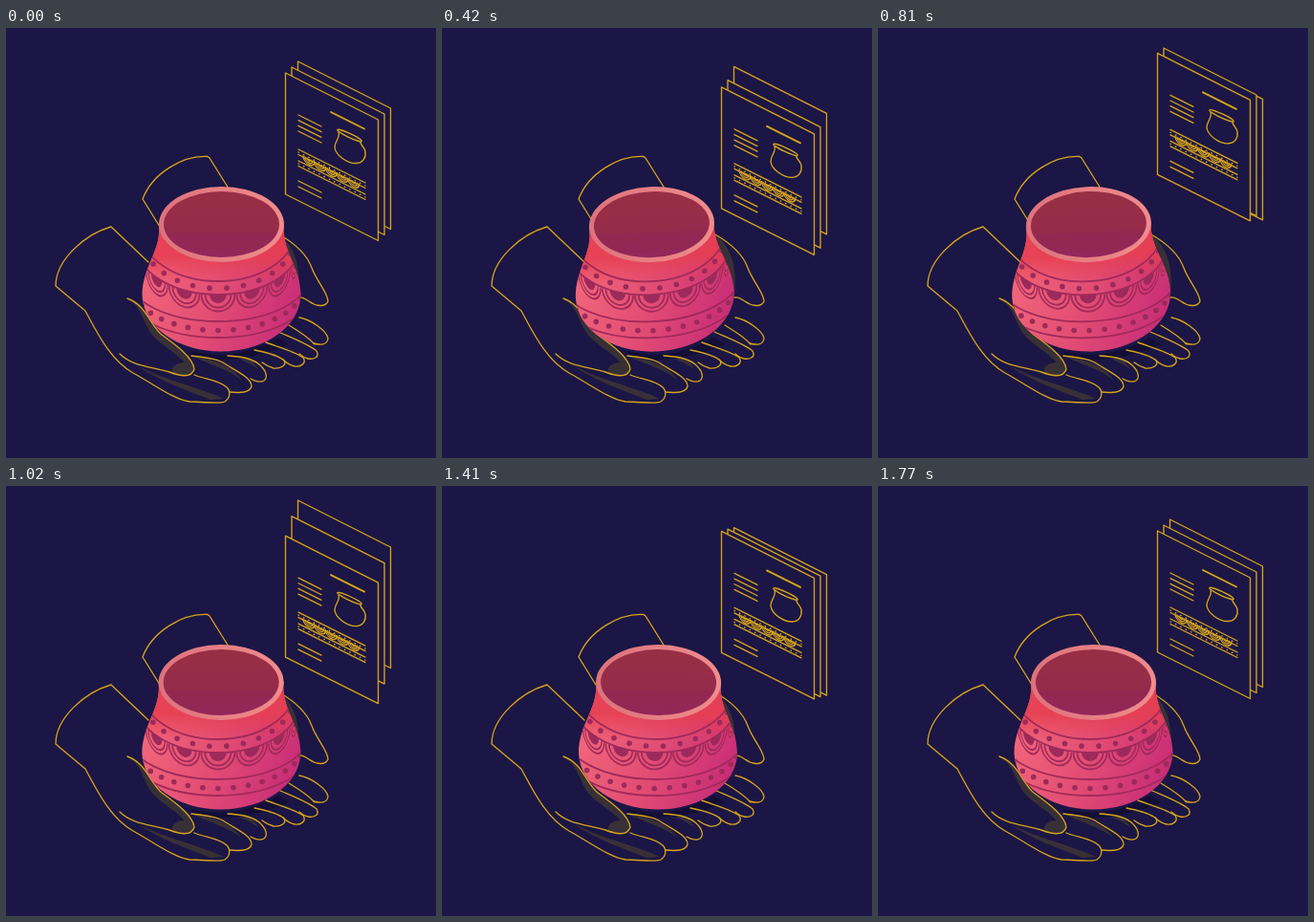
An HTML page that plays this animation: 450x450 px, repeating every 1800 ms.

```html
<!DOCTYPE html>
<html>
<head>
<meta charset="utf-8">
<style>
html, body { margin: 0; width: 100%; height: 100%; overflow: hidden; background: #1b1645 }
svg { display: block; width: 100vw; height: 100vh }
.line { fill: none; stroke: #d6a31a; stroke-width: 1.35; stroke-linejoin: round; stroke-linecap: round }
.shade { fill: #383037 }
.sheet { fill: #1b1645; stroke: #d6a31a; stroke-width: 1.35; stroke-linejoin: round }
.deco { fill: none; stroke: #a12a5a; stroke-width: 1.8 }
.dot { fill: #9c2a5a }
</style>
</head>
<body>
<svg viewBox="0 0 450 450">
  <defs>
    <linearGradient id="clay" gradientUnits="userSpaceOnUse" x1="150" y1="250" x2="298" y2="312">
      <stop offset="0" stop-color="#f1667a"/><stop offset=".5" stop-color="#e24c74"/><stop offset="1" stop-color="#c82d77"/>
    </linearGradient>
    <linearGradient id="neck" gradientUnits="userSpaceOnUse" x1="0" y1="238" x2="0" y2="266">
      <stop offset="0" stop-color="#e63e51" stop-opacity=".9"/><stop offset="1" stop-color="#e63e51" stop-opacity="0"/>
    </linearGradient>
    <linearGradient id="rim">
      <stop offset="0" stop-color="#dd727c"/><stop offset="1" stop-color="#f08c8c"/>
    </linearGradient>
    <linearGradient id="hole" x2="0" y2="1">
      <stop offset="0" stop-color="#992f43"/><stop offset=".62" stop-color="#952b4b"/>
      <stop offset=".62" stop-color="#922950"/><stop offset="1" stop-color="#93275a"/>
    </linearGradient>
    <path id="body" d="M160 205C163 233 143 249 142.500 279C143 313 180 338.500 225 338.500S308 313 308.500 279C308 249 288 233 291 205Z"/>
    <clipPath id="inside"><use href="#body"/></clipPath>
    <path id="page" d="M0 0L97 49V175.500L0 127Z"/>
  </defs>

  <g class="shade">
    <path d="M127 283C147 290 150 310 163 321C178 332 196 345 197 357C194 366 183 365 174 360C172 354 180 350 187 350C176 338 157 329 150 317C142 302 140 291 127 283Z"/>
    <path d="M136 352C160 367 200 375 228 388L214 389C192 380 160 370 136 352Z"/>
    <path d="M284 215C302 226 309 250 306 278L299 286Z"/>
    <path d="M194 343C215 346 236 352 247 369C236 358 215 353 194 343ZM236 343C252 344 260 349 264 357C254 350 246 347 236 343Z"/>
  </g>
  <path d="M194 338Q240 350 284 324L296 331Q240 355 194 343Z" fill="#130e35"/>
  <g class="line">
    <path d="M149 245L110 208C82 216 52 243 52 270L83 296C96 320 109 347 133 361C155 373 176 389 192 391C207 391 223 394 229 391C235 387 235 380 231 376C222 368 209 368 197 363"/>
    <path d="M127 283C147 290 150 310 163 321C178 332 196 345 197 357C194 367 181 364 171 360C151 354 132 354 119 341"/>
    <path d="M194 343C210 345 222 346 230 352C241 359 257 366 257 375C255 382 245 382 234 381"/>
    <path d="M232 343C246 344 256 345 265 352C273 359 274 366 270 369Q265 372 256 367"/>
    <path d="M260 337C270 339 286 343 291 348C294 353 287 357 280 356Q273 354 268 350"/>
    <path d="M272 329C282 333 302 338 311 345C315 351 308 355 302 354Q296 353 290 347"/>
    <path d="M285 318C296 323 317 331 325 338C329 345 321 347 316 346Q311 345 307 341"/>
    <path d="M296 311C306 317 316 323 323 331"/>
    <path d="M307 303C319 305 336 317 337 325C336 332 329 332 322 330"/>
    <path d="M284 215C302 225 315 237 320 251C325 265 337 277 337 286C334 293 324 291 317 286Q310 281 306 282"/>
    <path d="M161 208L143 179C153 152 185 133 211 134.500L213 136L233 168"/>
  </g>

  <g id="sheets">
    <use class="sheet" href="#page" x="305.500" y="35"/>
    <use class="sheet" href="#page" x="299" y="41"/>
    <g>
      <use class="sheet" href="#page" x="292.500" y="47"/>
      <g class="line" id="print">
        <path d="M340 88L375 105.500" stroke-width="1.900"/>
        <path d="M348 109C350 115 344 118 344 125C345 133 357 142 367 141.500C374 141 377 135 376 129C375 124 370 122 371 118.500"/>
        <ellipse cx="359.500" cy="112.500" rx="14" ry="2" transform="rotate(25 359.500 112.500)"/>
      </g>
    </g>
  </g>

  <g id="pot">
    <use href="#body" fill="url(#clay)"/>
    <use href="#body" fill="url(#neck)"/>
    <g id="pattern" clip-path="url(#inside)"></g>
    <ellipse cx="225.500" cy="205.500" rx="65.500" ry="39.500" fill="url(#rim)"/>
    <ellipse cx="225.500" cy="205.500" rx="60.500" ry="34.500" fill="url(#hole)"/>
  </g>
</svg>
<script>
const $ = id => document.getElementById(id);
const range = (from, to) => Array.from({ length: to - from + 1 }, (_, i) => from + i);

// Bands wrap round the pot: a is the angle from the front, y the height at the front.
const wrap = (a, y, rx, ry) => [222 + rx * Math.sin(a), y - ry * (1 - Math.cos(a))];
const band = (y, rx, ry) =>
  `<path class="deco" d="M${222 - rx} ${y - ry}a${rx} ${ry} 0 0 0 ${2 * rx} 0"/>`;
const dot = (...at) => {
  const [x, y] = wrap(...at);
  return `<circle class="dot" cx="${x}" cy="${y}" r="2.800"/>`;
};
const half = r => `M${-r} 0A${r} ${r} 0 0 0 ${r} 0`;
const arch = k => {
  const a = k * .435, [x, y] = wrap(a, 279, 84, 50);
  return `<g transform="matrix(${Math.cos(a)} ${-.59 * Math.sin(a)} 0 1 ${x} ${y})">
    <path class="deco" d="${half(17.5)}${half(13.5)}"/><path class="dot" d="${half(9)}"/></g>`;
};
$('pattern').innerHTML =
  band(265, 80, 52) + band(279, 84, 50) + band(307, 95, 47) + band(324, 97, 48) +
  range(-6, 5).map(k => dot((k + .5) * .225, 272.5, 80, 54)).join('') +
  range(-7, 7).map(k => dot(k * .175, 316.5, 92, 51)).join('') +
  range(-3, 3).map(arch).join('');

const slant = (y, w, extra = '') => `<path d="M306 ${y}l${w} ${w / 2}" ${extra}/>`;
$('print').innerHTML +=
  [91, 96.7, 102.3, 108, 160, 166].map(y => slant(y, 24)).join('') +
  [127, 132.5, 139, 144.5].map(y => slant(y, 70)).join('') +
  [130, 142].map(y => slant(y, 70, 'stroke-dasharray=".5 5.5"')).join('') +
  range(0, 4).map(k => `<g transform="matrix(1 .5 0 1 ${317 + k * 11.7} ${137 + k * 5.85})">
    <path d="${half(6)}${half(4)}"/><path d="${half(2)}" fill="#d6a31a"/></g>`).join('');

// Eased interpolation through [time, value] keys.
const cosine = p => (1 - Math.cos(Math.PI * p)) / 2;
const smooth = p => p * p * p * (10 - 15 * p + 6 * p * p);
function ease(keys, t, curve) {
  const i = keys.findIndex(k => k[0] > t);
  if (i < 1) return keys[i < 0 ? keys.length - 1 : 0][1];
  const [t0, a] = keys[i - 1], [t1, b] = keys[i];
  return a + (b - a) * curve((t - t0) / (t1 - t0));
}
const bounce = [[115, 0], [390, 15], [775, -21], [1125, 10], [1475, 0]];
const rock = [[0, 0], [600, -3.3], [1200, .65], [1800, 0]];
const sheets = [...$('sheets').children];

function draw(now) {
  const t = now % 1800;
  sheets.forEach((s, i) =>
    s.setAttribute('transform', `translate(0 ${ease(bounce, t - (2 - i) * 95, smooth)})`));
  $('pot').setAttribute('transform', `rotate(${ease(rock, t, cosine)} 225.5 338)`);
  requestAnimationFrame(draw);
}
draw(performance.now());
</script>
</body>
</html>
```
